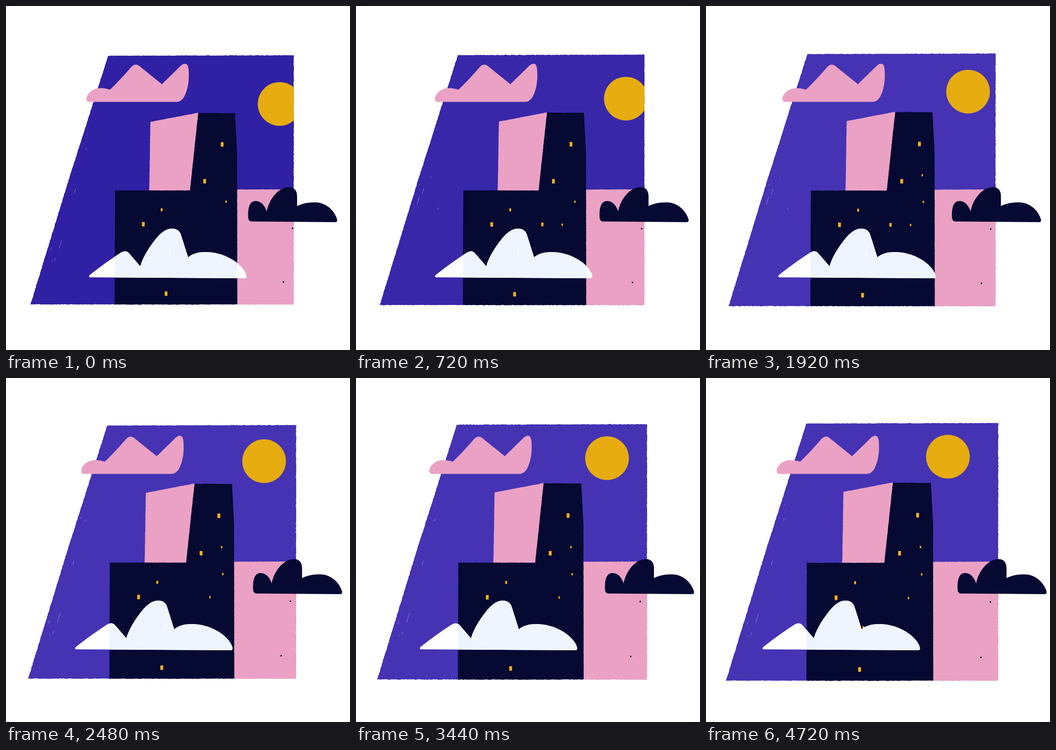
An HTML page with a canvas for the animation above (4.8 s loop, 748 by 748 pixels).

```html
<!DOCTYPE html>
<html lang="en">
<head>
<meta charset="utf-8">
<title>Night city</title>
<style>
  html, body { margin: 0; width: 100%; height: 100%; overflow: hidden; background: #fff; }
  canvas { display: block; }
</style>
</head>
<body>
<canvas id="stage" width="748" height="748"></canvas>
<script>
const ctx = document.getElementById('stage').getContext('2d');
const PINK = '#eaa1c4', DARK = '#060932', SUN = '#e6ac10', LAMP = '#f0b21e';
const STEP = 80, COUNT = 60;

const pinkCloud = new Path2D('M181 208.5C172 208 174 196 181 189C191 177 209 176 226 182Q249 160 272 133Q282 122 293 133L339 170L381 129C391 122 396 126 397 138C399 160 396 182 387 198Q381 208 371 208.5Z');
const whiteCloud = new Path2D('M183 590Q178 589 183 584Q216 558 250 536Q260 530 267 537L292 566Q299 540 326 506C341 488 352 484 361 484Q375 484 380 496L396 546.5Q409 535 434 535C472 535 508 556 520 579Q526 592 519 592Z');
const darkCloud = new Path2D('M532 468.5Q526 466 526.5 458C526 440 529 424 543 424Q560 425 567 447C571 422 591 396 612 394Q633 392 633 415V435Q651 426 672 427C697 427 715 446 720 464Q721 470 716 470Z');

const lamp = (x, y, w, on = 0, off = COUNT) => ({ x, y, w, on, off });
const lamps = [
  lamp(470, 301, 6), lamp(432, 381, 6), lamp(298.5, 474.5, 6), lamp(348, 625.5, 6),
  lamp(338.5, 443, 4), lamp(356, 537.5, 4), lamp(478.5, 425.5, 3),
  lamp(408, 474.5, 5, 5, 30), lamp(451, 475, 3, 5), lamp(476, 368, 3, 14)
];

function randomFrom(seed) {
  return () => (seed = seed * 16807 % 2147483647) / 2147483647;
}

function roughPath(points, random, amount) {
  const path = new Path2D();
  const wobble = () => (random() * 2 - 1) * amount;
  points.forEach(([x, y], i) => {
    const [nx, ny] = points[(i + 1) % points.length];
    const n = Math.ceil(Math.hypot(nx - x, ny - y) / 2.5);
    for (let k = 0; k < n; k++) {
      path.lineTo(x + (nx - x) * k / n + wobble(), y + (ny - y) * k / n + wobble());
    }
  });
  path.closePath();
  return path;
}

// faint dry-brush marks that follow the slanted left side of the sky
function brushMarks(random) {
  const path = new Path2D();
  for (let i = 0; i < 8; i++) {
    const y = 115 + 500 * random(), length = 2 + 20 * random() ** 2;
    const x = 222 - 0.31 * (y - 108) + 4 + 60 * random() ** 2;
    path.moveTo(x, y);
    path.lineTo(x - 0.31 * length, y + length);
  }
  return path;
}

// three hand-drawn versions of the scene, shown in turn
const textures = [101, 211, 307].map(seed => {
  const random = randomFrom(seed * 9973);
  return {
    sky: roughPath([[222, 108], [626, 107], [625.5, 649], [53, 649], [135.5, 380]], random, 0.5),
    tower: roughPath([[314, 252], [418, 232], [420, 404], [311.5, 404]], random, 0.25),
    block: roughPath([[502, 399], [660, 398.5], [660, 670], [502, 670]], random, 0.25),
    house: roughPath([[237, 401], [400, 401], [418, 232.5], [498, 233], [502.5, 320], [503, 670], [236, 670]], random, 0.25),
    marks: brushMarks(random)
  };
});

function fill(path, color) {
  ctx.fillStyle = color;
  ctx.fill(path);
}

function box(x, y, w, h, color) {
  ctx.fillStyle = color;
  ctx.fillRect(x - w / 2, y - h / 2, w, h);
}

function place(path, matrix) {
  const result = new Path2D();
  result.addPath(path, matrix);
  return result;
}

const shift = (path, dx) => place(path, new DOMMatrix().translate(dx, 0));

function draw(step) {
  const p = step / (COUNT - 1);
  const texture = textures[Math.floor((step + 3) / 5) % textures.length];
  const zoom = 1 + 0.034 * p;
  const slide = -14.3 * (p + 0.55 * p * (1 - p));
  const scene = new DOMMatrix([zoom, 0, 0, zoom, 340 * (1 - zoom), 379 * (1 - zoom)]);
  const city = new DOMMatrix().translate(slide, 0).multiply(scene);
  const house = place(texture.house, city);
  const lit = lamps.filter(({ on, off }) => step >= on && step < off);
  const drawLamps = color => {
    ctx.setTransform(city);
    lit.forEach(({ x, y, w }) => box(x, y, w, w * 1.6, color));
  };

  ctx.fillStyle = '#fff';
  ctx.fillRect(0, 0, 748, 748);

  ctx.save();
  const sky = place(texture.sky, scene);
  ctx.clip(sky);
  const glow = Math.min(1, step / 24);
  fill(sky, `rgb(${48 + 21 * glow}, ${32 + 19 * glow}, ${163 + 17 * glow})`);
  ctx.strokeStyle = 'rgba(255, 255, 255, 0.6)';
  ctx.lineWidth = 0.7;
  ctx.stroke(place(texture.marks, scene));

  const sun = new Path2D();
  sun.arc(595 - 69 * (p - 0.3 * p * (1 - p) ** 2), 171 + 42 * (1 - p) ** 1.95, 47.5, 0, Math.PI * 2);
  fill(sun, SUN);

  fill(place(texture.block, city), PINK);
  fill(place(texture.tower, city), PINK);
  fill(house, DARK);
  drawLamps(LAMP);
  box(623, 483.5, 3, 3, DARK);
  box(603, 600, 3, 3, DARK);
  ctx.restore();

  fill(shift(pinkCloud, -21.3 * p), PINK);
  fill(shift(darkCloud, 20.5 * p), DARK);

  // the white cloud takes a cool tint in front of the house
  const cloud = shift(whiteCloud, -57.5 * p);
  fill(cloud, '#fff');
  ctx.save();
  ctx.clip(cloud);
  fill(house, '#eef5ff');
  ctx.clip(house);
  drawLamps('#fff');
  ctx.restore();
}

function tick() {
  draw(Math.floor(performance.now() / STEP) % COUNT);
  requestAnimationFrame(tick);
}
tick();
</script>
</body>
</html>
```
